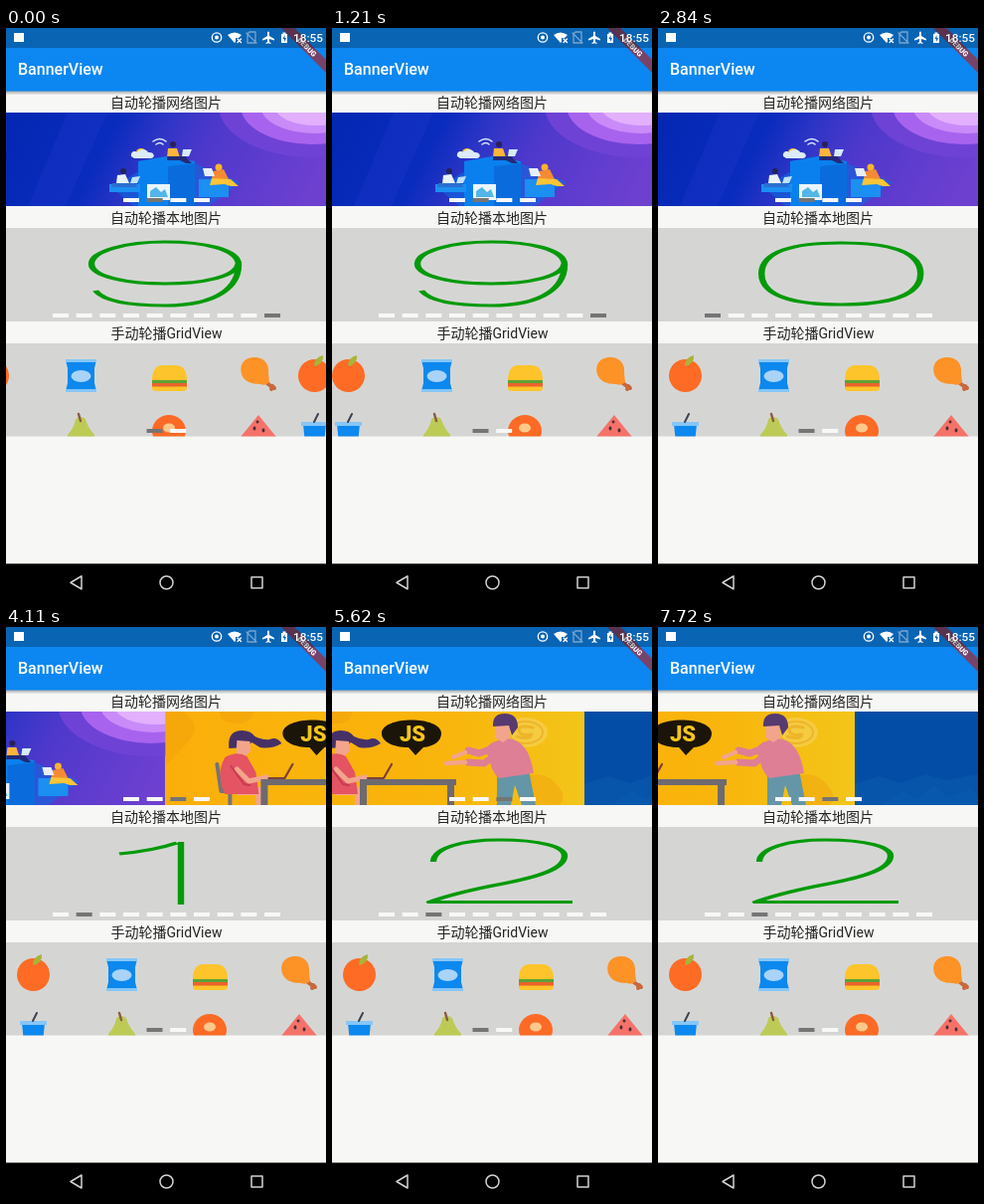
Animation, 322 px wide and 574 px high, one loop 8 s. Source, as an HTML page:

```html
<!DOCTYPE html>
<html lang="zh">
<head>
<meta charset="utf-8">
<style>
html, body { margin: 0; width: 322px; height: 574px; overflow: hidden; background: #f7f7f5 }
svg { display: block }
text { font-family: Roboto, "Noto Sans CJK SC", "Noto Sans CJK", sans-serif }
.line { fill: none; stroke-linecap: round; stroke-linejoin: round }
.digit { fill: none; stroke: #049a0a; stroke-width: 3.2; stroke-linejoin: round }
.label { font-size: 14px; fill: #242424; text-anchor: middle }
</style>
</head>
<body>
<svg id="stage" width="322" height="574" viewBox="0 0 322 574">
<defs>
  <linearGradient id="night" x1="0" y1=".4" x2="1" y2=".55">
    <stop offset="0" stop-color="#0428b4"/><stop offset=".3" stop-color="#0a2cbe"/>
    <stop offset=".45" stop-color="#2f35c6"/><stop offset=".6" stop-color="#4c38cb"/>
    <stop offset=".8" stop-color="#5e3cce"/><stop offset="1" stop-color="#6d40d0"/>
  </linearGradient>
  <linearGradient id="sun">
    <stop offset="0" stop-color="#fbae0a"/><stop offset=".6" stop-color="#f9b60c"/><stop offset="1" stop-color="#f3c51a"/>
  </linearGradient>
  <linearGradient id="shade" x2="0" y2="1">
    <stop offset="0" stop-color="#a9adb0"/><stop offset="1" stop-color="#f7f7f5"/>
  </linearGradient>

  <g id="team">
    <path fill="url(#night)" d="M0 85h322v94H0z"/>
    <path fill="#2238cc" opacity=".3" d="M62 85h40L60 179H22z"/>
    <ellipse cx="308" cy="78" rx="94" ry="52" fill="#6f42d6"/>
    <ellipse cx="308" cy="78" rx="72" ry="39" fill="#a863ee"/>
    <ellipse cx="310" cy="78" rx="54" ry="28" fill="#c98bf8"/>
    <ellipse cx="312" cy="78" rx="42" ry="20" fill="#e2b0fd"/>
    <path fill="#0a6fe2" d="M106 160l28-16 56-8 46 19-32 24h-76z" opacity=".55"/>
    <path fill="#0a80ee" d="M133 134l28-5 29 5v45h-57z"/>
    <path fill="#0a5fd0" d="M163 139l27-3v43h-27z" opacity=".6"/>
    <path fill="#1b8ff2" d="M104 157h31v8h-31zM194 152h30v18h-30z"/>
    <path fill="#eaf5fd" d="M142 157h23v16h-23z"/>
    <path fill="#53b5e8" d="M145 164l6-4 5 5 4-3 3 8h-18z"/>
    <ellipse cx="136" cy="125" rx="5" ry="4" fill="#ffc82c"/>
    <path fill="#dcecfb" d="M126 129c-1-5 4-6 6-4 3-5 10-3 11 0 6-1 8 5 3 6h-17z"/>
    <path class="line" stroke="#dceafb" stroke-width="1.5" d="M148 114q7-5 13 0M151 117q4-3 7 0"/>
    <circle cx="118" cy="144" r="3" fill="#252258"/>
    <path fill="#e9f2f7" d="M112 148l8-1 4 9h-13z"/>
    <path fill="#2a6fd0" d="M107 156h22l4 4h-27z"/>
    <path fill="#bfe2f6" d="M127 150l8-1-3 7h-7z"/>
    <circle cx="168" cy="117" r="3" fill="#2b2058"/>
    <path fill="#fbb53a" d="M163 121h9l3 9h-13z"/>
    <path fill="#242a77" d="M162 129h18l7 7h-6l-6-3h-13z"/>
    <path fill="#d6ebfa" d="M178 122h9l-3 7h-7z"/>
    <circle cx="214" cy="140" r="3.5" fill="#fbb22e"/>
    <path fill="#f58a32" d="M208 144l11-2 5 10h-17z"/>
    <path fill="#fbc437" d="M207 151l19 1 8 7h-8l-6-2-15 1z"/>
    <path fill="#e8eefa" d="M198 141h9l3 8h-10z"/>
  </g>

  <g id="coders">
    <path fill="url(#sun)" d="M0 85h322v94H0z"/>
    <path fill="#ee9c0a" opacity=".4" d="M0 85h18q20 14 5 30T0 140zM55 85h34q-4 14-20 12T55 85zM262 150q20-6 32 8t2 21h-36z"/>
    <ellipse cx="263" cy="106" rx="22" ry="15" fill="#f5cb40"/>
    <ellipse cx="263" cy="106" rx="17" ry="11" fill="none" stroke="#eeb52a" stroke-width="2"/>
    <path class="line" stroke="#eeb52a" stroke-width="3" d="M270 101q-15-3-14 3t13 4q-2 6-15 2"/>
    <path class="line" stroke="#77727a" stroke-width="4" d="M52 138l4 27h24M65 167v12"/>
    <path fill="#f2a58c" d="M72 160l24 1q6 2 4 18h-9v-10H72z"/>
    <path fill="#463167" d="M64 122q-2-18 13-18 9 0 13 6 8 4 15 3 7-3 12 4-10 6-22 4l-8-5-7 5z"/>
    <path fill="#f2a58c" d="M72 114l13 1 1 10-5 4H71z"/>
    <path fill="#e45462" d="M60 131q12-7 22-1l9 16 3 22H60q-10-20 0-37z"/>
    <path class="line" stroke="#f2a58c" stroke-width="5" d="M72 143l12 12 18-4"/>
    <path class="line" stroke="#c43c55" stroke-width="2" d="M66 140l13 18 6 1"/>
    <path class="line" stroke="#7d4038" stroke-width="2.200" d="M104 152h16l8-14"/>
    <path fill="#6e6a70" d="M96 153h97v6h-2v20h-7v-20h-81v20h-7z"/>
    <path fill="#1b1509" d="M118 107c0-18 60-18 60 0 0 8-8 13-18 14l-8 8-7-8c-16 0-27-6-27-14z"/>
    <text x="149" y="115" text-anchor="middle" font-size="22" font-weight="900" fill="#f4c51c">JS</text>
    <path fill="#6496a7" d="M234 146l32-2 7 35h-14l-7-20-4 20h-14z"/>
    <path fill="#de7f95" d="M221 124q8-11 24-12 21 2 26 35l-35 5q-9-8-9-20z"/>
    <path class="line" stroke="#de7f95" stroke-width="7" d="M238 119l-22 8-11-3M238 125l-17 12-16-1"/>
    <path class="line" stroke="#f2a58c" stroke-width="4.500" d="M202 126l-12 5M202 136l-19 1"/>
    <path fill="#f2a58c" d="M233 98h14v13l-7 5-8-5z"/>
    <path fill="#563a70" d="M230 100q-1-13 12-13 13 0 13 14l-6 8-3-10z"/>
  </g>

  <g id="ocean">
    <path fill="#034da6" d="M0 85h322v94H0z"/>
    <path fill="#0655ab" d="M0 158l24-8 22 7 25-9 20 6 40-7 40 9 60-9 91 8v24H0z"/>
    <path fill="#0a5cb0" opacity=".6" d="M28 179l20-14 14 8 18-13 14 12 22-9 16 16z"/>
  </g>

  <g id="food">
    <ellipse cx="27.500" cy="349.500" rx="16.500" ry="16.500" fill="#fd6b25"/>
    <path fill="#a9b43a" d="M27 340q0-9 9-11 1 9-9 11z"/>
    <path fill="#0c88ee" d="M101 334h31l-2 8v15l2 8h-31l2-8v-15z"/>
    <path fill="#86c6f7" d="M101 333h31v3h-31zM101 363h31v3h-31z"/>
    <ellipse cx="116.500" cy="350" rx="10" ry="6" fill="#a9d3f8"/>
    <path fill="#fdc42b" d="M188 354q0-15 11-15h12q12 0 12 15zM188 360h35v2q0 3-4 3h-27q-4 0-4-3z"/>
    <path fill="#5da236" d="M188 354h35v3.500h-35z"/>
    <path fill="#ea642a" d="M188 357h35v3.500h-35z"/>
    <path class="line" stroke="#c8683e" stroke-width="4" d="M301 355l8 6M308 363l1-3 2 2"/>
    <path fill="#fd9227" d="M278 348c-3-11 4-17 13-17 11 0 15 8 14 16l1 9q-4 4-9 2-16 0-19-10z"/>
    <path fill="#0c88ee" d="M16 398h23l-3 30H19z"/>
    <path fill="#86c6f7" d="M14 396h27v4H14z"/>
    <path class="line" stroke="#3c4250" stroke-width="2" d="M31 388l-4 8"/>
    <path fill="#bdcb56" d="M111 393q5-4 10 0 2 8 9 16 2 22-14 22t-13-22q7-8 8-16z"/>
    <path class="line" stroke="#8c5c42" stroke-width="2.500" d="M114 388l2 7"/>
    <ellipse cx="205" cy="405" rx="17" ry="16" fill="#fc6a25"/>
    <ellipse cx="205" cy="402" rx="6" ry="4.500" fill="#fdc98b"/>
    <path fill="#f5726a" d="M295 389l22 27h-44z"/>
    <path class="line" stroke="#4a2f35" stroke-width="2.800" d="M291 402v1M300 404v1M294 396h.1"/>
  </g>
</defs>

<path fill="#0c87f1" d="M0 0h322v64H0z"/>
<path fill="url(#shade)" d="M0 63.500h322v4H0z"/>
<text x="12" y="47" font-size="16" font-weight="500" fill="#fff">BannerView</text>

<g transform="translate(322 0) rotate(45)">
  <path fill="#b71c1c" fill-opacity=".63" d="M-40 22.400h80v9.400h-80z"/>
  <text x="0" y="29.800" text-anchor="middle" font-size="7.400" font-weight="900" fill="#fff">DEBUG</text>
</g>

<path fill-opacity=".26" d="M0 0h322v20H0z"/>
<g id="status" fill="#fff">
  <path d="M8 5h10v9H8z"/>
  <circle cx="212" cy="9.500" r="4.700" fill="none" stroke="#fff" stroke-width="1.300"/>
  <circle cx="212" cy="9.500" r="2"/>
  <path d="M223 7q7-5 14 0l-3 3h-3v4l-1 1z"/>
  <path class="line" stroke="#fff" stroke-width="1.300" d="M233 11l3.500 3.500m0-3.500l-3.500 3.500"/>
  <path class="line" stroke="#78a4d0" stroke-width="1.300" d="M243 6l2-2h6v11h-8zM242 5l10 10"/>
  <path d="M263 4q1-1 2 0v4l5 3v1.500l-5-1.500v3l1.500 1v1l-2.500-.7-2.500.7v-1l1.500-1v-3l-5 1.500V11l5-3z"/>
  <path d="M277 6h1.500V4.500h3V6h1.500v9h-6z"/>
  <path fill="#0a63b3" d="M280.500 7l-2 4h1.500v3l2-4h-1.500z"/>
  <text x="289" y="14" font-size="11.800" font-weight="500">18:55</text>
</g>

<text class="label" x="161" y="80">自动轮播网络图片</text>
<text class="label" x="161" y="196">自动轮播本地图片</text>
<text class="label" x="161.500" y="312">手动轮播GridView</text>

<svg y="85" width="322" height="94" viewBox="0 85 322 94">
  <g id="photos">
    <use href="#team"/><use href="#coders" x="322"/><use href="#ocean" x="644"/>
  </g>
</svg>
<path fill="#d5d6d4" d="M0 201h322v94H0zM0 317h322v93.500H0z"/>
<svg y="201" width="322" height="94" viewBox="0 201 322 94"><g id="digits"></g></svg>
<svg y="317" width="322" height="93.500" viewBox="0 317 322 93.500">
  <g id="foods"><use href="#food"/><use href="#food" x="324"/></g>
</svg>
<g id="dots"></g>

<path d="M0 538.500h322v36H0z"/>
<g class="line" stroke="#d2d2d2" stroke-width="1.500">
  <path d="M76 551v13l-11-6.500z"/><circle cx="161.500" cy="557.500" r="6.500"/><path d="M247 552h11v11h-11z"/>
</g>
</svg>

<script>
const $ = id => document.getElementById(id);
const W = 322, LOOP = 8000;

// Digit strokes, drawn at half width and widened with the page; listed from page -1
const strokes = [
  'M117 235C117 250 99 257 80 257S43 250 43 237 61 215 80 215 117 222 117 238C117 258 108 279 80 279 60 279 49 274 45 264',
  'M80 216C103 216 120 224 120 247S103 278 80 278 40 270 40 247 57 216 80 216Z',
  'M57 228Q74 225 86 217M88 216V279',
  'M51 236C51 222 66 214 84 214 105 214 117 221 117 230 117 243 104 251 86 258 70 264 58 270 49 276.500H121'
];
$('digits').innerHTML = strokes.map((d, i) =>
  `<path class="digit" transform="translate(${(i - 1) * W}) scale(2 1)" d="${d}"/>`).join('');

// Page indicators: [count, first x, y]
const bars = [[4, 118, 171], [10, 47, 287], [2, 141.5, 403]].map(([n, x, y]) =>
  Array.from({ length: n }, (_, i) => {
    const r = document.createElementNS('http://www.w3.org/2000/svg', 'rect');
    Object.entries({ x: x + i * 23.67, y, width: 16, height: 4 }).forEach(a => r.setAttribute(...a));
    return $('dots').appendChild(r);
  }));
const mark = (row, page) => row.forEach((r, i) =>
  r.setAttribute('fill', i === (page + row.length) % row.length ? '#757575' : '#f8f8f8'));

// Scroll in pixels: [time, value] with smooth steps between
const photoKeys = [[3700, 0], [4520, 322], [5200, 322], [5620, 390], [6620, 452], [7320, 448], [7720, 446]];
const digitKeys = [[2400, -322], [2930, 0], [3600, 0], [4080, 322], [5160, 322], [5600, 644]];
const foodKeys = [[0, 41], [1210, 11], [1650, 0]];

function at(keys, t) {
  const i = keys.findIndex(k => k[0] > t);
  if (i < 0) return keys[keys.length - 1][1];
  if (!i) return keys[0][1];
  const [t0, a] = keys[i - 1], [t1, b] = keys[i];
  const u = (t - t0) / (t1 - t0);
  return a + (b - a) * u * u * (3 - 2 * u);
}

const start = performance.now();
function draw(now) {
  const t = Math.max(0, now - start) % LOOP;
  const photo = at(photoKeys, t), digit = at(digitKeys, t), food = at(foodKeys, t);
  const slide = (id, x) => $(id).setAttribute('transform', `translate(${-x})`);
  slide('photos', photo);
  slide('digits', digit);
  slide('foods', food);
  mark(bars[0], Math.round(photo / W) + 1);
  mark(bars[1], Math.round(digit / W));
  mark(bars[2], 0);
  requestAnimationFrame(draw);
}
draw(start);
</script>
</body>
</html>
```
